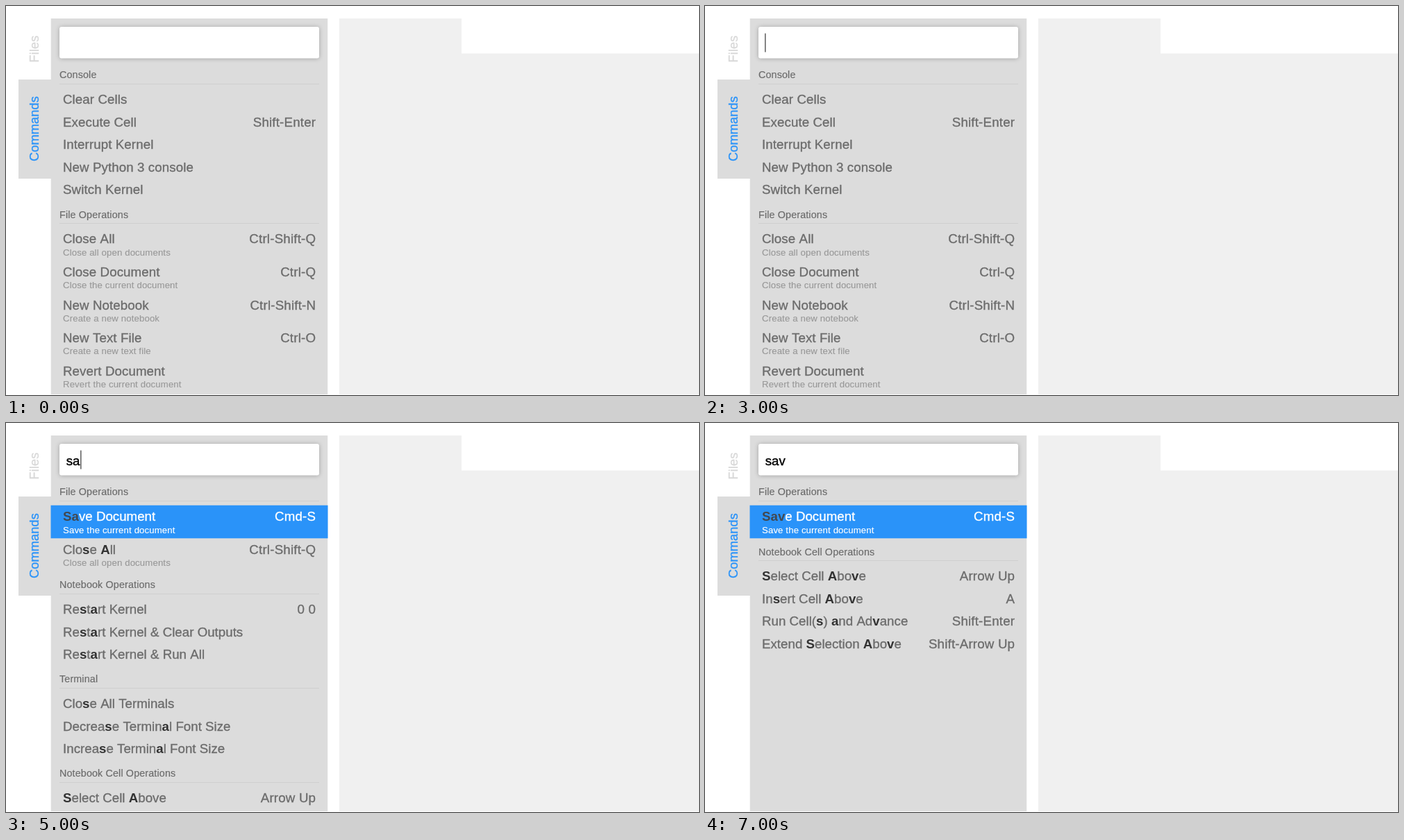
An HTML page with a canvas that plays this animation: 998 px wide and 561 px high, repeating every 8000 ms.

```html
<!DOCTYPE html>
<html lang="en">
<head>
<meta charset="utf-8">
<title>Command palette search</title>
<style>
html, body { margin: 0; width: 100%; height: 100%; overflow: hidden; background: #fff; }
canvas { display: block; width: 998px; height: 561px; }
</style>
</head>
<body>
<canvas id="stage"></canvas>
<script>
const W = 998, H = 561, LOOP = 8000;
const FONT = '"Liberation Sans", Arial, sans-serif';
const BLUE = '#2a93f9', PANEL = '#dcdcdc', INK = '#6c6c6c';
const ROW = 32.5, TALL_ROW = 47.6, HEADER = 38.6;

const canvas = document.getElementById('stage');
const ctx = canvas.getContext('2d');
const dpr = window.devicePixelRatio || 1;
canvas.width = Math.round(W * dpr);
canvas.height = Math.round(H * dpr);

// Rows are [title, shortcut, description]; asterisks enclose matched letters.
const closeAll = ['Close All', 'Ctrl-Shift-Q', 'Close all open documents'];
const closeDoc = ['Close Document', 'Ctrl-Q', 'Close the current document'];
const retitle = (row, title) => [title, ...row.slice(1)];
const saveDoc = title => [title, 'Cmd-S', 'Save the current document'];

const lists = {
  '': [
    ['Console', [
      ['Clear Cells'], ['Execute Cell', 'Shift-Enter'], ['Interrupt Kernel'],
      ['New Python 3 console'], ['Switch Kernel']]],
    ['File Operations', [
      closeAll, closeDoc,
      ['New Notebook', 'Ctrl-Shift-N', 'Create a new notebook'],
      ['New Text File', 'Ctrl-O', 'Create a new text file'],
      ['Revert Document', '', 'Revert the current document']]]
  ],
  s: [
    ['Console', [['*S*witch Kernel'], ['Clear Cell*s*'], ['New Python 3 con*s*ole']]],
    ['File Operations', [
      saveDoc('*S*ave Document'),
      retitle(closeAll, 'Clo*s*e All'),
      retitle(closeDoc, 'Clo*s*e Document')]],
    ['Help', [
      ['Scipy Lecture Notes', '', 'Open Scipy Lecture Notes'],
      ['Scipy Reference', '', 'Open Scipy Reference'],
      ['SymPy Reference', '', 'Open SymPy Reference']]]
  ],
  sa: [
    ['File Operations', [saveDoc('*Sa*ve Document'), retitle(closeAll, 'Clo*s*e *A*ll')]],
    ['Notebook Operations', [
      ['Re*s*t*a*rt Kernel', '0 0'],
      ['Re*s*t*a*rt Kernel & Clear Outputs'],
      ['Re*s*t*a*rt Kernel & Run All']]],
    ['Terminal', [
      ['Clo*s*e All Terminals'],
      ['Decrea*s*e Termin*a*l Font Size'],
      ['Increa*s*e Termin*a*l Font Size']]],
    ['Notebook Cell Operations', [['*S*elect Cell *A*bove', 'Arrow Up']]]
  ],
  sav: [
    ['File Operations', [saveDoc('*Sav*e Document')]],
    ['Notebook Cell Operations', [
      ['*S*elect Cell *A*bo*v*e', 'Arrow Up'],
      ['In*s*ert Cell *A*bo*v*e', 'A'],
      ['Run Cell(*s*) *a*nd Ad*v*ance', 'Shift-Enter'],
      ['Extend *S*election *A*bo*v*e', 'Shift-Arrow Up']]]
  ]
};

const caretX = { '': 86.2, s: 96.8, sa: 107.2, sav: 116.3 };

function box(x, y, w, h, color) {
  ctx.fillStyle = color;
  ctx.fillRect(x, y, w, h);
}

// Draws text and returns its width; a thin outline gives a medium weight.
function label(text, x, y, { size = 18.7, color = INK, weight = 400, gap = 0.1, edge = 0.35, align = 'left' } = {}) {
  ctx.font = `${weight} ${size}px ${FONT}`;
  ctx.letterSpacing = gap + 'px';
  ctx.textAlign = 'left';
  const width = ctx.measureText(text).width;
  const left = align === 'right' ? x - width : align === 'center' ? x - width / 2 : x;
  ctx.fillStyle = ctx.strokeStyle = color;
  ctx.fillText(text, left, y);
  if (edge) {
    ctx.lineWidth = edge;
    ctx.lineJoin = 'round';
    ctx.strokeText(text, left, y);
  }
  return width;
}

function sideLabel(text, y, color) {
  ctx.save();
  ctx.translate(47.3, y);
  ctx.rotate(-Math.PI / 2);
  label(text, 0, 0, { size: 18.2, color, align: 'center' });
  ctx.restore();
}

function drawRow([title, shortcut, note], y, active) {
  const height = note ? TALL_ROW : ROW;
  const color = active ? '#fff' : INK;
  if (active) box(64.5, y - 0.4, 399, height, BLUE);
  const parts = title.split('*');
  const gap = parts.length > 1 ? 0.02 : 0.1;
  let x = 82;
  parts.forEach((part, i) => {
    const style = i % 2 ? { color: active ? '#424850' : '#333', weight: 700, edge: 0 } : { color };
    if (part) x += label(part, x, y + 22.1, { gap, ...style });
  });
  if (shortcut) label(shortcut, 446.2, y + 22.1, { color, gap: 0.2, align: 'right' });
  if (note) label(note, 82, y + 39.4, { size: 13.2, color: active ? '#fff' : '#999', gap: 0.13, edge: 0.15 });
  return height;
}

function drawList(query) {
  ctx.save();
  ctx.beginPath();
  ctx.rect(64, 18, 400, 542);
  ctx.clip();
  let y = 80.5, active = query !== '';
  for (const [heading, rows] of lists[query]) {
    label(heading, 77, y + 23.9, { size: 14.3, gap: 0.15, edge: 0.2 });
    box(77, Math.floor(y + 32), 374, 1, '#cfcfcf');
    y += HEADER;
    for (const row of rows) {
      y += drawRow(row, y, active);
      active = false;
    }
  }
  ctx.restore();
}

function drawInput(query, caret) {
  ctx.save();
  ctx.shadowColor = 'rgba(0,0,0,.26)';
  ctx.shadowBlur = 6 * dpr;
  ctx.shadowOffsetY = 0.5 * dpr;
  ctx.fillStyle = '#fff';
  ctx.beginPath();
  ctx.roundRect(77, 30, 374, 45.5, 3);
  ctx.fill();
  ctx.restore();
  if (query) {
    const style = query === 's' ? { weight: 700, edge: 0 } : {};
    label(query, 86.8, 60.8, { size: 18.6, color: '#000', gap: 0, edge: 0.4, ...style });
  }
  if (caret) box(caretX[query], 39.5, 1.3, 27, '#444');
}

function draw(t) {
  const query = t < 3330 ? '' : t < 5000 ? 's' : t < 6000 ? 'sa' : 'sav';
  const caret = t < 3000 ? t >= 1000 && t < 2000 : t < 7000;
  ctx.setTransform(dpr, 0, 0, dpr, 0, 0);
  box(0, 0, W, H, '#fff');
  box(480, 18, 176, 542, '#f0f0f0');
  box(656, 68.5, 342, 491.5, '#f0f0f0');
  box(64.7, 18, 398.5, 542, PANEL);
  box(18, 106, 47, 143, PANEL);
  sideLabel('Files', 62, '#d8d8d8');
  sideLabel('Commands', 177, BLUE);
  drawInput(query, caret);
  drawList(query);
}

const start = performance.now();
function tick() {
  draw((performance.now() - start) % LOOP);
  requestAnimationFrame(tick);
}
tick();
</script>
</body>
</html>
```
